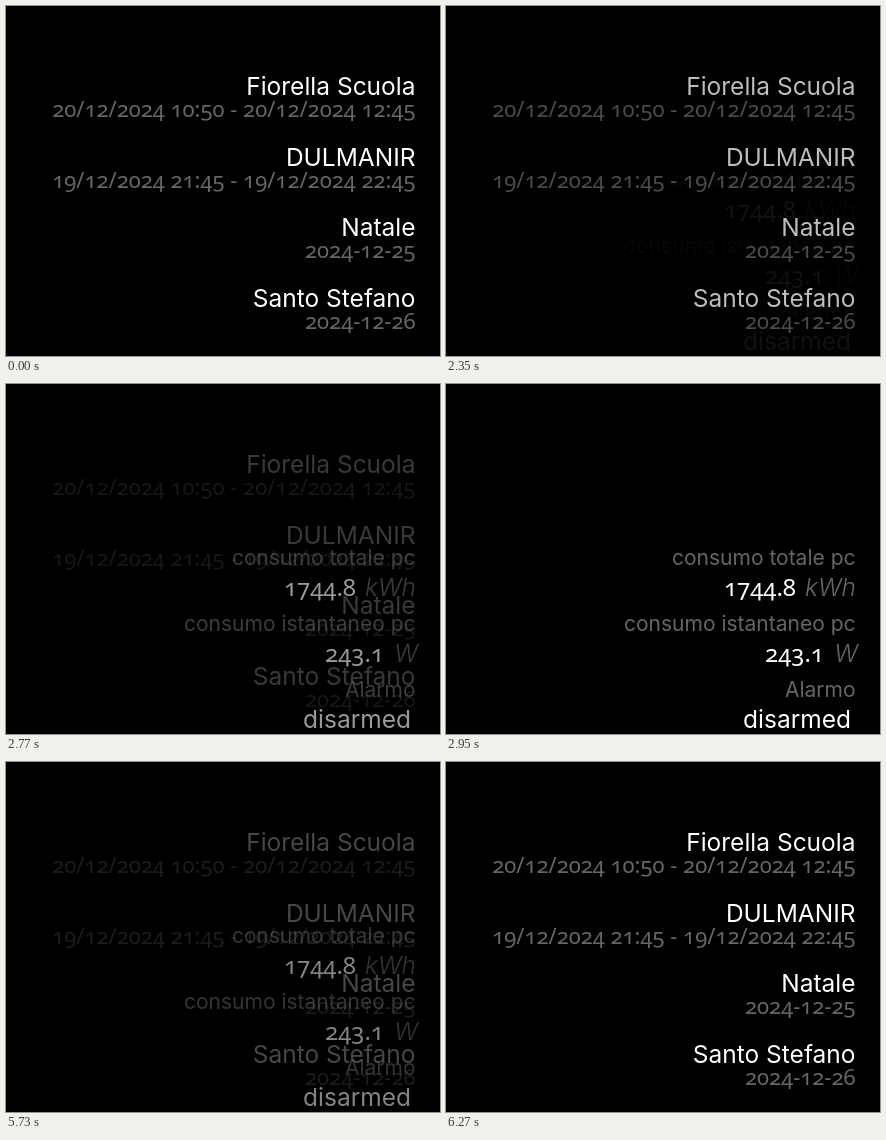
An HTML page for the animation above (6440 ms loop, 434 by 350 pixels).

```html
<!DOCTYPE html>
<html lang="it">
<head>
<meta charset="utf-8">
<style>
  html, body { margin: 0; width: 100%; height: 100%; overflow: hidden; background: #000; }
  svg { display: block; }
  text { font-family: Inter, sans-serif; font-optical-sizing: none; text-anchor: end; }
  .title { font-size: 24.5px; fill: #fff; }
  .label { font-size: 21px; fill: #666; }
  .unit { font-size: 24.5px; font-style: italic; font-weight: 300; fill: #666; }
  .date, .value { font-family: "Noto Sans", sans-serif; font-variant-numeric: oldstyle-nums; }
  .date { font-size: 22px; font-weight: 300; fill: #666; }
  .value { font-size: 24px; fill: #fff; }
</style>
</head>
<body>
<svg width="434" height="350" viewBox="0 0 434 350">
  <g id="calendar"></g>
  <g id="sensors"></g>
</svg>
<script>
const LOOP = 6440, STEP = 30;
const calendar = document.getElementById('calendar');
const sensors = document.getElementById('sensors');

function addText(group, style, x, y, content) {
  const node = document.createElementNS('http://www.w3.org/2000/svg', 'text');
  node.setAttribute('class', style);
  node.setAttribute('x', x);
  node.setAttribute('y', y);
  node.textContent = content;
  group.append(node);
}

[
  ['Fiorella Scuola', '20/12/2024 10:50 - 20/12/2024 12:45'],
  ['DULMANIR', '19/12/2024 21:45 - 19/12/2024 22:45'],
  ['Natale', '2024-12-25'],
  ['Santo Stefano', '2024-12-26']
].forEach(([title, date], i) => {
  const y = 89 + i * 70.7;
  addText(calendar, 'title', 409.5, y, title);
  addText(calendar, 'date', 409.5, y + 22, date);
});

['consumo totale pc', 'consumo istantaneo pc', 'Alarmo'].forEach((label, i) =>
  addText(sensors, 'label', 409.5, 181 + i * 66, label));
addText(sensors, 'value', 350, 212, '1744.8');
addText(sensors, 'unit', 410, 212, 'kWh');
addText(sensors, 'value', 378, 278, '243.1');
addText(sensors, 'unit', 412, 278, 'W');
addText(sensors, 'title', 405, 344, 'disarmed');

// Linear progress in whole steps, already one step in at its start time
function progress(time, start, steps) {
  const done = Math.floor((time - start) / STEP) + 1;
  return Math.min(1, Math.max(0, done / steps));
}

function draw(now) {
  const time = now % LOOP;
  const shown = progress(time, 2170, 27) - progress(time, 5550, 25);
  calendar.setAttribute('opacity', 1 - shown);
  sensors.setAttribute('opacity', shown * shown);
  requestAnimationFrame(draw);
}
draw(0);
</script>
</body>
</html>
```
